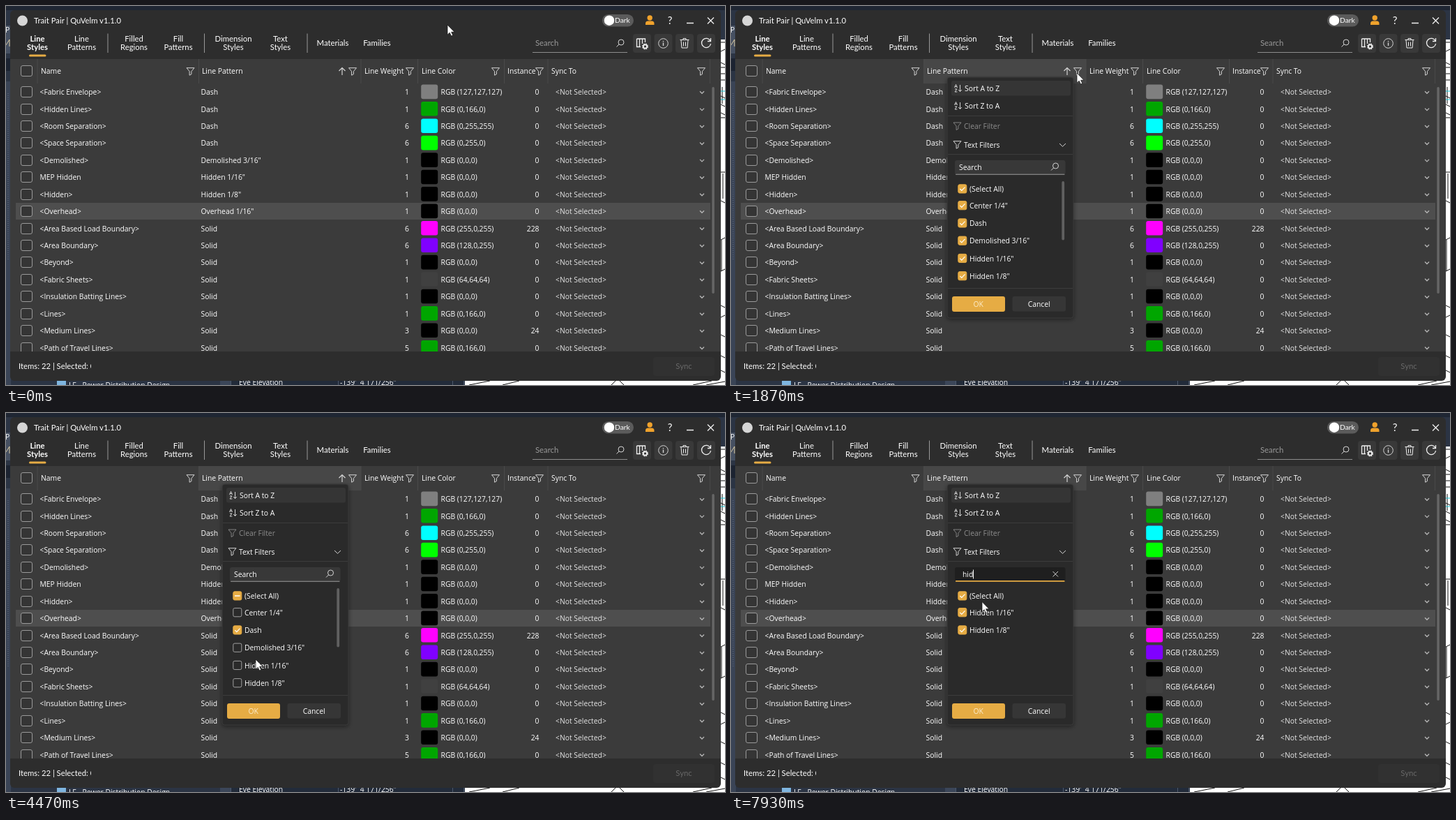
An HTML page for the animation above (8000 ms loop, 1031x543 px).

```html
<!DOCTYPE html>
<html lang="en">
<head>
<meta charset="utf-8">
<title>Line style filter</title>
<style>
  html, body { margin: 0; width: 100%; height: 100%; overflow: hidden; background: #2b3444; }
  svg { display: block; width: 100%; height: 100%; }
  text { font: 10.35px "Open Sans", "Noto Sans", sans-serif; fill: #fff; white-space: pre; }
  .ui { font: 11.3px Lato, sans-serif; }
  .bold { font-weight: 700; }
  .mid { text-anchor: middle; }
  .end { text-anchor: end; }
  .line { fill: none; stroke: #d4d4d4; stroke-width: 1; }
  .dim { fill: #8c8c8c; }
</style>
</head>
<body>
<svg id="stage" viewBox="0 0 1031 543" preserveAspectRatio="none">
  <defs>
    <path id="funnel" class="line" d="M-5.5-5H5.5L1.4 0V4L-1.4 5.5V0Z"/>
    <path id="chevron" class="line" d="M-3-1.5 0 1.5 3-1.5" style="stroke:#b4b4b4;stroke-width:1.4"/>
    <g id="lens" class="line"><circle cx="1" cy="-1" r="4"/><path d="M-2 2-5.5 5.5"/></g>
    <g id="sort">
      <path class="line" d="M8.5-5V4.5M6 2 8.5 4.5 11 2"/>
      <path class="line" d="M.5-1 2.5-5.5 4.5-1M1.2-2.5H3.8M1 1H4L1 5H4.3" stroke-width=".8"/>
    </g>
    <clipPath id="rowsClip"><rect x="7" y="111" width="1017" height="384"/></clipPath>
    <clipPath id="menuClip"><rect x="290" y="100" width="222" height="370"/></clipPath>
    <clipPath id="countClip"><rect x="14" y="500" width="108" height="30"/></clipPath>
    <filter id="shadow" x="-10%" y="-10%" width="120%" height="120%">
      <feDropShadow dx="0" dy="2" stdDeviation="3" flood-opacity=".45"/>
    </filter>
  </defs>
  <g id="backdrop"></g>
  <g id="window"></g>
  <g clip-path="url(#menuClip)"><g id="menu">
    <g id="menuBase"></g><g id="searchBox"></g><g id="list"></g><g id="okButton"></g>
  </g></g>
  <path id="arrow" d="M0 0V14.2L3.2 11.2 5.5 16 7.8 15 5.6 10.3H10Z" fill="#fff" stroke="#111" stroke-width=".7"/>
  <g id="beam" transform="translate(367 233)">
    <path d="M-3-7H-1L0-6 1-7H3M0-6V6M-3 7H-1L0 6 1 7H3" fill="none" stroke="#111" stroke-width="2.4"/>
    <path d="M-3-7H-1L0-6 1-7H3M0-6V6M-3 7H-1L0 6 1 7H3" fill="none" stroke="#fff" stroke-width="1.1"/>
  </g>
</svg>
<script>
const byId = id => document.getElementById(id);
const esc = s => s.replace(/&/g, '&amp;').replace(/</g, '&lt;');
const rect = (x, y, w, h, fill, rx = 0, more = '') =>
  `<rect x="${x}" y="${y}" width="${w}" height="${h}" fill="${fill}" rx="${rx}" ${more}/>`;
const text = (x, y, s, cls = '', more = '') => `<text x="${x}" y="${y}" class="${cls}" ${more}>${esc(s)}</text>`;
const path = (d, more = '') => `<path class="line" d="${d}" ${more}/>`;
const use = (id, x, y, more = '') => `<use href="#${id}" x="${x}" y="${y}" ${more}/>`;
const AMBER = '#e6ac44', INK = 'style="stroke:#111"';

function drawBackdrop() {
  let s = rect(0, 0, 1031, 543, '#2b3444') + rect(0, 0, 1031, 6, '#1f2633')
    + rect(0, 28, 7, 40, '#465062') + text(-1, 38, 'Pr') + path('M0 56 5 48V58', 'style="stroke:#d9c9a0"')
    + rect(0, 75, 7, 18, '#1c2331') + rect(0, 108, 7, 435, '#3a4456')
    + path('M3 125V365', 'style="stroke:#667084" stroke-dasharray="1 2"');
  // drawing sheet behind the right and bottom edges
  s += rect(1022, 48, 9, 495, '#fff') + rect(658, 535, 373, 8, '#fff');
  for (const y of [52, 66, 80, 88, 97, 106, 128, 140, 152, 160, 238, 278, 336, 381, 428, 447, 470, 500, 521])
    s += path(`M1023 ${y}L1031 ${y + (y % 3) * 4 - 4}`, INK);
  s += path('M1027 116V140M1028 240V276M1026 335V380', INK)
    + path('M1024 122H1031M1024 134H1031', 'style="stroke:#19c8d8"')
    + path('M664 543 694 537M712 543 736 537M868 543 874 537M880 537 886 543M985 543 1012 537M1004 543 1031 538', INK);
  s += rect(307, 535, 15, 8, '#3b4659') + rect(322, 535, 334, 8, '#222b3a')
    + path('M322.5 535V543M476.5 535V543M640.5 535V543M656.5 535V543', 'style="stroke:#4c586c"')
    + rect(73, 537, 13, 6, '#7fb5e0') + text(90, 547, 'LF - Power Distribution Design')
    + text(334, 543, 'Eve Elevation') + text(479, 543, '-139\'  4 171/256"');
  byId('backdrop').innerHTML = s;
}

function drawTitleBar() {
  let s = rect(6, 6, 1019, 531, '#2d2d2d', 6) + '<circle cx="23.5" cy="21" r="7.5" fill="#d6d6d6"/>'
    + text(40, 24.5, 'Trait Pair | QuVelm v1.1.0', 'ui')
    + rect(855, 12, 45, 17.5, '#5b5b5b', 8.7) + '<circle cx="865" cy="20.7" r="7.2" fill="#fff"/>'
    + text(873, 24.3, 'Dark', 'ui', 'style="font-size:10.3px"')
    + `<path d="M917 27V25Q917 21.5 920.5 21.5H926Q929.5 21.5 929.5 25V27Z" fill="#f0a22c"/><circle cx="923.2" cy="17" r="3.7" fill="#f0a22c"/>`
    + text(952, 26, '?', 'ui mid', 'style="font-size:15px"')
    + path('M976 24.5H986M1006 16.5 1015 25.5M1015 16.5 1006 25.5', 'style="stroke:#eee;stroke-width:1.3"');

  const tabs = [[45, 'Line', 'Styles'], [108.5, 'Line', 'Patterns'], [183.5, 'Filled', 'Regions'], [247, 'Fill', 'Patterns'],
    [326, 'Dimension', 'Styles'], [393.5, 'Text', 'Styles'], [468.5, 'Materials'], [532, 'Families']];
  tabs.forEach(([x, ...words], i) => words.forEach((word, j) => {
    s += text(x, words.length > 1 ? 51 + j * 12 : 57, word, 'ui mid' + (i ? '' : ' bold'));
  }));
  s += rect(33, 69.6, 24.5, 3, AMBER, 1.5) + path('M146 39.5V67M284.5 39.5V67M432 39.5V67', 'style="stroke:#999"');

  s += text(759, 57, 'Search', 'ui', 'style="fill:#999"') + path('M755 66.5H891', 'style="stroke:#8d8d8d"') + use('lens', 881, 53);
  for (const x of [912, 942.5, 973, 1004]) s += rect(x - 13, 40, 26, 27, '#393939', 4);
  s += path('M904.5 47H916.5V52M904.5 47V58.5H910M908.5 47V58.5M912.5 47V54', 'style="stroke:#eee;stroke-width:1.3"')
    + '<circle cx="916.5" cy="58" r="3.2" fill="none" stroke="#eee" stroke-width="2.4" stroke-dasharray="1.7 .8"/><circle cx="916.5" cy="58" r="2.5" fill="none" stroke="#eee" stroke-width="1.5"/>'
    + '<circle cx="942.5" cy="53.5" r="6.8" class="line"/>' + path('M942.5 52.5V57M942.5 50V51.3', 'style="stroke-width:1.4"')
    + path('M966.5 48.5H979.5M971 48V46.5H975V48M968 49 969 60H977L978 49M971.5 51.5V57.5M974.5 51.5V57.5', 'style="stroke:#eee"')
    + path('M1010 50A6.6 6.6 0 1 0 1010.6 54M1010.5 46V50.5H1006', 'style="stroke:#eee;stroke-width:1.3"');
  return s;
}

const columns = [[45, 'Name', 50, 264.5], [276.5, 'Line Pattern', 281, 497], [509, 'Line Weight', 514, 579],
  [590.5, 'Line Color', 596, 702], [714.5, 'Instance', 719, 765], [777, 'Sync To', 782, 997]];
const edges = [...columns.map(c => c[0]), 1010];
const checkbox = y => rect(21.5, Math.round(y) - 7.5, 16, 15, '#353535', 2.5, 'stroke="#9a9a9a"');

const styles = `<Fabric Envelope>|Dash|1|127,127,127
<Hidden Lines>|Dash|1|0,166,0
<Room Separation>|Dash|6|0,255,255
<Space Separation>|Dash|6|0,255,0
<Demolished>|Demolished 3/16"|1|0,0,0
MEP Hidden|Hidden 1/16"|1|0,0,0
<Hidden>|Hidden 1/8"|1|0,0,0
<Overhead>|Overhead 1/16"|1|0,0,0
<Area Based Load Boundary>|Solid|6|255,0,255|228
<Area Boundary>|Solid|6|128,0,255
<Beyond>|Solid|1|0,0,0
<Fabric Sheets>|Solid|1|64,64,64
<Insulation Batting Lines>|Solid|1|0,0,0
<Lines>|Solid|1|0,166,0
<Medium Lines>|Solid|3|0,0,0|24
<Path of Travel Lines>|Solid|5|0,166,0`.split('\n').map(row => row.split('|'));

function drawGrid() {
  let s = rect(6, 76, 1019, 419, '#3b3b3b') + rect(0, 76, 0, 35, '#474747', 0, 'id="hover"') + checkbox(93.3);
  for (const [edge, label, x, filterX] of columns)
    s += path(`M${edge} 76V111`, 'style="stroke:#4a4a4a"') + text(x, 97.3, label) + use('funnel', filterX, 93.7);
  s += path('M1009.5 76V111', 'style="stroke:#4a4a4a"') + path('M482 99V88.5M477.5 93 482 88.5 486.5 93', 'style="stroke-width:1.2"');

  s += '<g clip-path="url(#rowsClip)">';
  styles.forEach(([name, pattern, weight, rgb, count = '0'], i) => {
    const y = 123.2 + 24.42 * i, base = y + 4;
    if (name === '<Overhead>') s += rect(14, Math.round(y) - 12, 996, 24, '#4e4e4e');
    s += checkbox(y) + text(48.5, base, name) + text(279.5, base, pattern) + text(578, base, weight, 'end')
      + rect(595.2, y - 10.6, 24, 20.6, `rgb(${rgb})`, 3) + text(623.5, base, `RGB (${rgb})`)
      + text(764.5, base, count, 'end') + text(788, base, '<Not Selected>', '', 'style="fill:#e4e4e4"') + use('chevron', 998, y + .5);
  });
  s += '</g>' + rect(1012.3, 116, 3.5, 296, '#666', 1.7);

  s += `<g clip-path="url(#countClip)">${text(18, 520, 'Items: 22 | Selected: 0', 'ui')}</g>`
    + rect(928, 503, 88, 27, '#313131', 4) + text(972, 520, 'Sync', 'ui mid', 'style="fill:#686868"');
  return s;
}

function drawMenuBase() {
  byId('menuBase').innerHTML = rect(310, 102, 181, 345, '#2b2b2b', 4, 'stroke="#3b3b3b" stroke-width=".8" filter="url(#shadow)"')
    + rect(316, 107, 171, 21.5, '#353535', 3)
    + use('sort', 320, 118) + text(335, 121.5, 'Sort A to Z') + use('sort', 320, 143) + text(335, 146.7, 'Sort Z to A')
    + use('funnel', 324.5, 172, 'opacity=".5"') + text(334, 175.8, 'Clear Filter', 'dim')
    + use('funnel', 324.5, 198.7) + text(334, 202.6, 'Text Filters') + path('M471 197 475.5 201.3 480 197')
    + path('M311 157.5H490M311 212.5H490M311 404.5H490', 'style="stroke:#3c3c3c"')
    + rect(403.5, 416, 76.5, 21.5, '#363636', 3) + text(441.7, 430.5, 'Cancel', 'mid');
}

// Moments, counted in steps of 1/15 s
const AT = { open: 26, clear: 56, pickDash: 63, beam: 83, focus: 86, h: 101, hi: 106, hid: 114, arrowBack: 119 };
const listChanges = [AT.open, AT.clear, AT.pickDash, AT.h, AT.hi, AT.hid];
const patterns = ['Center 1/4"', 'Dash', 'Demolished 3/16"', 'Hidden 1/16"', 'Hidden 1/8"', 'Overhead 1/16"', 'Solid'];
const queryAt = k => k >= AT.hid ? 'hid' : k >= AT.hi ? 'hi' : k >= AT.h ? 'h' : '';
const latest = (moments, k) => Math.max(...moments.filter(m => m <= k));

function drawList(k) {
  const query = queryAt(k);
  const names = patterns.filter(n => n.toLowerCase().includes(query)).slice(0, 5);
  const cleared = k >= AT.clear && k < AT.h;
  const partial = cleared && k >= AT.pickDash;
  const drawn = Math.min(1, Math.max(.12, (k - latest(listChanges, k)) / 2));
  let s = '';
  ['(Select All)', ...names].forEach((name, i) => {
    const y = i ? 285.8 + 25.25 * (i - 1) : 262;
    const on = !cleared || (partial && (i === 0 || name === 'Dash'));
    s += rect(325.8, y - 6.2, 12, 12.2, on ? AMBER : 'none', 2, `stroke="${on ? AMBER : '#a0a0a0'}"`);
    if (on) s += i === 0 && partial
      ? path(`M328 ${y}H335.6`, 'style="stroke:#fff;stroke-width:1.5"')
      : path(`M328.3 ${y}L330.8 ${y + 2.5} 335.5 ${y - 2.4}`, `pathLength="1" stroke-dasharray="${drawn} 2" style="stroke:#fff;stroke-width:1.2"`);
    s += text(342, y + 4, name);
  });
  if (!query) s += rect(474.3, 251, 3.8, 84.5, '#606060', 1.9);
  return s;
}

function drawSearch(k) {
  const query = queryAt(k), focused = k >= AT.focus;
  let s = rect(321, 221, 158.5, 20.5, focused ? '#1f1f1f' : k >= AT.beam ? '#434343' : '#383838', 3)
    + rect(322, focused ? 240 : 240.7, 156.5, focused ? 1.8 : 1, focused ? AMBER : '#9a9a9a', .5);
  s += focused ? text(332, 235, query, '', 'id="query"') : text(327, 235, 'Search');
  s += query ? path('M461.5 227 469 234.5M469 227 461.5 234.5') : use('lens', 464.5, 230);
  byId('searchBox').innerHTML = s;
  if (!focused) return;
  const typed = latest([AT.focus, AT.h, AT.hi, AT.hid], k);
  if (Math.floor((k - typed) / 8) % 2 === 0) {
    const x = 332 + (query ? byId('query').getComputedTextLength() : 0);
    byId('searchBox').innerHTML += rect(x - .3, 224.5, 1, 13, '#fff');
  }
}

function drawOk(k) {
  const disabled = k >= AT.clear && k < AT.pickDash, hovered = k >= 71 && k <= 75;
  return rect(317, 416, 76, 22, disabled ? '#3a3a3a' : hovered ? '#d6a040' : AMBER, 3)
    + text(354.7, 430.5, 'OK', 'mid', `style="fill:${disabled ? '#777' : '#fbeccb'}"`);
}

// Pointer path: step, x, y
const track = [[0, 633, 27], [3, 633, 27], [5, 622, 40], [7, 585, 72], [9, 520, 98], [11, 447, 105], [14, 507, 98],
  [15, 507, 98], [21, 496, 96], [30, 496, 96], [33, 462, 160], [36, 392, 300], [39, 352, 394], [40, 352, 391],
  [43, 365, 334], [49, 356, 261], [57, 356, 261], [61, 352, 306], [64, 352, 306], [67, 358, 353], [72, 355, 430],
  [74, 356, 431], [81, 364, 231], [118, 364, 231], [119, 360, 270.5], [120, 360, 270.5]];

function pointerAt(k) {
  const i = Math.max(1, track.findIndex(p => p[0] >= k));
  const [k0, x0, y0] = track[i - 1], [k1, x1, y1] = track[i];
  const f = (k - k0) / (k1 - k0);
  return [x0 + (x1 - x0) * f, y0 + (y1 - y0) * f];
}

const show = (id, on) => byId(id).setAttribute('visibility', on ? 'visible' : 'hidden');

function render(k) {
  const [x, y] = pointerAt(k);
  byId('arrow').setAttribute('transform', `translate(${x} ${y})`);
  show('arrow', k < AT.beam || k >= AT.arrowBack);
  show('beam', k >= AT.beam && k < AT.h);

  const open = k >= AT.open;
  const col = open ? 1 : y > 76 && y < 111 ? edges.findIndex((e, i) => x >= e && x < edges[i + 1]) : -1;
  byId('hover').setAttribute('x', col < 0 ? 0 : edges[col]);
  byId('hover').setAttribute('width', col < 0 ? 0 : edges[col + 1] - edges[col]);

  byId('menu').style.display = open ? '' : 'none';
  if (!open) return;
  const slide = -239 * Math.max(0, 1 - (k - AT.open) / 2) ** 2.3;
  byId('menu').setAttribute('transform', `translate(0 ${slide})`);
  drawSearch(k);
  byId('list').innerHTML = drawList(k);
  byId('okButton').innerHTML = drawOk(k);
}

drawBackdrop();
byId('window').innerHTML = drawTitleBar() + drawGrid();
drawMenuBase();

const start = performance.now();
let shown = -1;
function tick() {
  const t = (performance.now() - start) % 8000;
  const k = Math.min(119, Math.floor((t + 4) * 15 / 1000));
  if (k !== shown) render(shown = k);
  requestAnimationFrame(tick);
}
tick();
</script>
</body>
</html>
```
